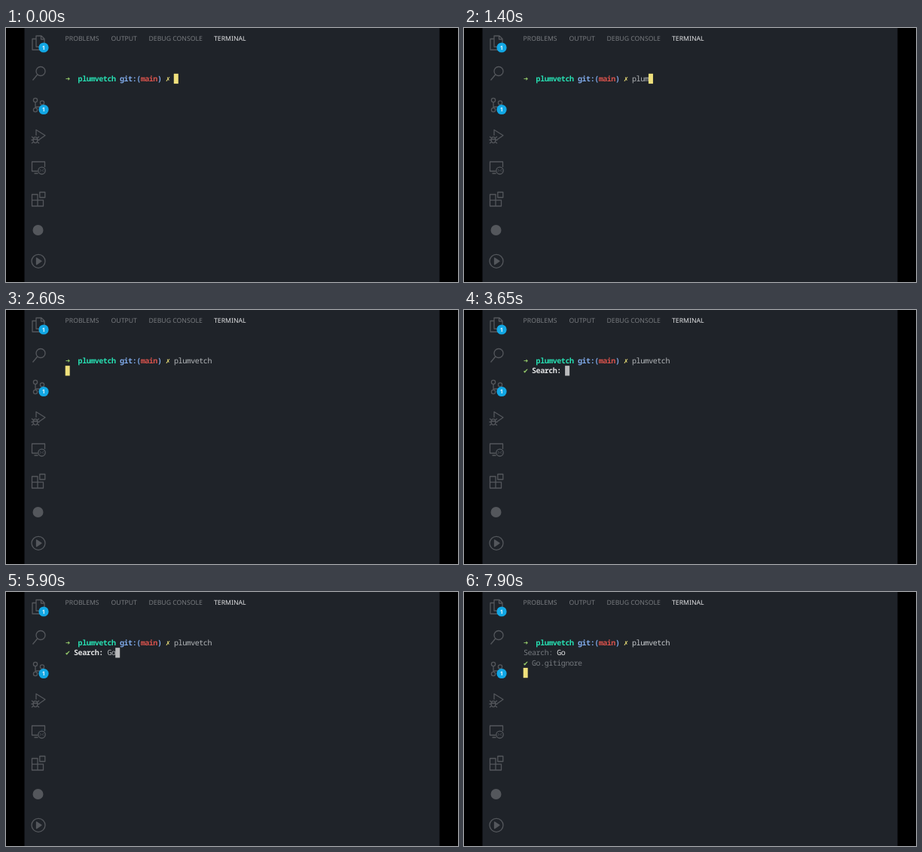
Animation, 600 px wide and 338 px high, one loop 8 s. Source, as an HTML page:

```html
<!DOCTYPE html>
<html lang="en">
<head>
<meta charset="utf-8">
<title>Terminal session</title>
<style>
  html, body { margin: 0; width: 100%; height: 100%; overflow: hidden; background: #000; }
  svg { display: block; width: 100vw; height: 100vh; }
  text { white-space: pre; text-rendering: geometricPrecision; }
  .tabs { font: 8.7px "Noto Sans", "Open Sans", sans-serif; fill: #777a7e; }
  .icons { fill: none; stroke: #54575c; stroke-width: 1.3; stroke-linejoin: round; }
  .badge circle { fill: #12a7e4; }
  .badge text { font: bold 7.5px "Noto Sans", sans-serif; fill: #e8f6fd; text-anchor: middle; }
  #term { font: 10px "Noto Sans Mono", "DejaVu Sans Mono", monospace; letter-spacing: -.046em; }
  #term .s { font-family: "DejaVu Sans Mono", monospace; }
  .b { font-weight: bold; }
  .u { text-decoration: underline; }
</style>
</head>
<body>
<svg viewBox="0 0 600 338">
  <rect x="24.500" width="551" height="338" fill="#1f2329"/>

  <g class="icons">
    <!-- files -->
    <path d="M40 10.500h7l4 4v10.500h-11zM46.500 10.500v4.500h4.500M40 14.500h-5v14.500h10.500v-4"/>
    <!-- search -->
    <circle cx="46" cy="57.500" r="6"/>
    <path d="M41.700 62L35.500 69.500"/>
    <!-- branches -->
    <circle cx="39" cy="96" r="2.600"/>
    <circle cx="39" cy="109" r="2.600"/>
    <circle cx="48" cy="99.500" r="2.600"/>
    <path d="M39 98.600v7.800M48 102q-.5 3-4 3h-5"/>
    <!-- run and debug -->
    <path d="M40 143v-7.500l12 7.500-8 5.500"/>
    <ellipse cx="39" cy="149" rx="2.800" ry="3.800"/>
    <path d="M36 148h6M33.500 149h2.700M41.800 149h2.700M34 144.500l2.500 2M44 144.500l-2.500 2M34 153.500l2.500-2M44 153.500l-2.500-2"/>
    <!-- remote screen -->
    <path d="M42 190.500h-7.500v-12.500h17v7M37.500 193.500h5"/>
    <circle cx="47.500" cy="189.800" r="4.700"/>
    <path d="M45 188l1.700 1.700-1.700 1.700M50 188l-1.700 1.700 1.700 1.700" stroke-width=".8"/>
    <!-- extensions -->
    <path d="M34.500 221.500h7.500v15.500h-7.500zM34.500 229.200h15v7.800h-7.500M44.800 218.500h7v7h-7z"/>
    <circle cx="42.500" cy="269" r="7" fill="#54575c" stroke="none"/>
    <!-- play -->
    <circle cx="43" cy="310.300" r="9"/>
    <path d="M40.500 306v8.600l6.500-4.300z" fill="#54575c"/>
  </g>
  <g class="badge">
    <circle cx="50" cy="26" r="6.600"/><text x="50" y="28.700">1</text>
    <circle cx="50" cy="108.500" r="6.600"/><text x="50" y="111.200">1</text>
  </g>

  <g class="tabs">
    <text x="78.500" y="17">PROBLEMS</text>
    <text x="139.500" y="17">OUTPUT</text>
    <text x="189.500" y="17">DEBUG CONSOLE</text>
    <text x="276" y="17" fill="#e2e3e5">TERMINAL</text>
  </g>

  <g id="term"></g>
</svg>
<script>
const LOOP = 8000, LEFT = 79, TOP = 61, COL = 5.541, ROW = 13.37;
const COMMAND = 'plumvetch', QUERY = 'Go';
const COMMAND_KEYS = [1150, 1200, 1300, 1400, 1500, 1600, 1750, 2000, 2150];
const QUERY_KEYS = [5650, 5800];
const ENTER = 2550, ASK = 2700, LIST = 6050, PICK = 7350;
const C = {
  text: '#c9cccf', typed: '#b3b6b9', dim: '#74787d', white: '#e2e3e4',
  green: '#98cf6c', teal: '#27e0b3', blue: '#7fa9e8', red: '#d8524c',
  yellow: '#ece078', cursor: '#efe07c', block: '#b9babc', ask: '#5a94d8'
};
const term = document.getElementById('term');

const put = (row, col, str, color, cls = '') =>
  `<text class="${cls}" x="${LEFT + col * COL}" y="${TOP + 10 + row * ROW}" fill="${color}">${str}</text>`;

const block = (row, col, color) =>
  `<rect x="${LEFT - .3 + col * COL}" y="${TOP - .2 + row * ROW}" width="6" height="13.3" fill="${color}"/>`;

const typed = (word, keys, t) => word.slice(0, keys.filter(k => t >= k).length);

function shellLine(t) {
  const word = typed(COMMAND, COMMAND_KEYS, t);
  return put(0, 0, '➜', C.green, 's b') + put(0, 3, COMMAND, C.teal, 'b') +
    put(0, 13, 'git:(', C.blue, 'b') + put(0, 18, 'main', C.red, 'b') +
    put(0, 22, ')', C.blue, 'b') + put(0, 24, '✗', C.yellow, 's b') +
    put(0, 26, word, t < LIST ? C.typed : C.text) +
    (t < ENTER ? block(0, 26 + word.length, C.cursor) : '');
}

function searchLine(t) {
  const word = typed(QUERY, QUERY_KEYS, t);
  return put(1, 0, '✔', C.green, 's b') + put(1, 2, 'Search:', C.white, 'b') +
    put(1, 10, word, C.typed) + block(1, 10 + word.length, C.block);
}

const answered = () => put(1, 0, 'Search:', C.dim) + put(1, 8, QUERY, C.white);

function results() {
  const names = [QUERY, 'Gofen', 'R', 'D', 'C'];
  return put(2, 0, 'Use the arrow keys to navigate:', C.dim) +
    put(2, 32, '↓ ↑ → ←', C.dim, 's b') +
    put(3, 0, '?', C.ask) + put(3, 2, 'Results:', C.text) +
    put(4, 2, '▸', C.text, 's') + put(8, 0, '↓', C.text, 's b') +
    names.map((n, i) => put(4 + i, 4, n + '.gitignore', C.text, i ? '' : 'u')).join('');
}

const picked = () => put(2, 0, '✔', C.green, 's b') +
  put(2, 2, QUERY + '.gitignore', C.dim) + block(3, 0, C.cursor);

function screen(t) {
  const top = shellLine(t);
  if (t < ENTER) return top;
  if (t < ASK) return top + block(1, 0, C.cursor);
  if (t < LIST) return top + searchLine(t);
  return top + answered() + (t < PICK ? results() : picked());
}

let shown = '';
const start = performance.now();
function draw() {
  const next = screen((performance.now() - start) % LOOP);
  if (next !== shown) term.innerHTML = shown = next;
  requestAnimationFrame(draw);
}
draw();
</script>
</body>
</html>
```
